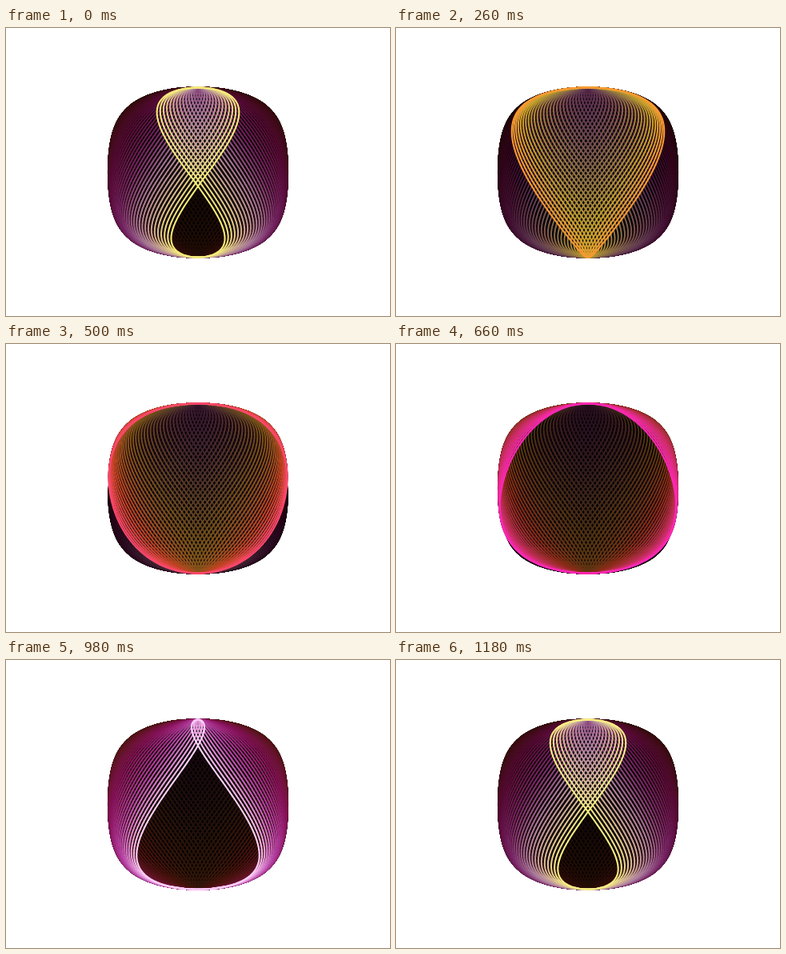
An HTML page with a canvas for the animation above (1200 ms loop, 480 by 360 pixels).

```html
<!DOCTYPE html>
<html>
<head>
<meta charset="utf-8">
<style>
  html, body { margin: 0; width: 100%; height: 100%; overflow: hidden; background: #fff; }
  canvas { display: block; }
</style>
</head>
<body>
<canvas id="stage" width="480" height="360"></canvas>
<script>
const ctx = document.getElementById('stage').getContext('2d');
const LOOP = 1200, STEP = 20, COUNT = LOOP / STEP;
const CX = 240, CY = 180.5, HEIGHT = 106;
const WIDE = 112, TWIST = 85;
const POINTS = 140;

// how many steps red, green and blue take to fade
const FADE = [24, 18, 21];

// time in ms, then red, green, blue
const STOPS = [
  [0, 248, 236, 120], [140, 245, 220, 56], [360, 255, 98, 45],
  [660, 255, 40, 184], [840, 240, 96, 226], [980, 255, 210, 250],
  [1180, 248, 240, 132], [1200, 248, 236, 120]
];

const wrap = ms => ((ms % LOOP) + LOOP) % LOOP;

function colorAt(ms, age) {
  const t = wrap(ms);
  const i = STOPS.findIndex(stop => stop[0] > t);
  const from = STOPS[i - 1], to = STOPS[i];
  const k = (t - from[0]) / (to[0] - from[0]);
  const rgb = FADE.map((steps, c) => {
    const full = from[c + 1] + (to[c + 1] - from[c + 1]) * k;
    return Math.round(full * Math.exp(-age / steps));
  });
  return `rgb(${rgb})`;
}

function strokeCurve(ms, color, width) {
  const phase = Math.PI * (ms + 43) / LOOP;
  const a = WIDE * Math.sin(phase), b = TWIST * Math.cos(phase);
  ctx.beginPath();
  for (let i = 0; i < POINTS; i++) {
    const u = i / POINTS * 2 * Math.PI;
    const c = Math.cos(u);
    ctx.lineTo(CX + Math.sin(u) * (a + b * c), CY - HEIGHT * c * (1.1 - 0.1 * c * c));
  }
  ctx.closePath();
  ctx.strokeStyle = color;
  ctx.lineWidth = width;
  ctx.stroke();
}

// The saturated colours die out a little sooner than the pale ones.
function isAlive(ms, age) {
  const t = wrap(ms);
  return age <= 55.5 || t < 100 || t > 800;
}

function draw(now) {
  ctx.fillStyle = '#fff';
  ctx.fillRect(0, 0, 480, 360);
  ctx.lineJoin = 'round';

  // dark bed between neighbouring lines
  for (let i = COUNT * 3; i > 0; i--) {
    const age = i / 3, ms = now - age * STEP;
    if (isAlive(ms, age)) strokeCurve(ms, '#000', 2.1);
  }
  for (let age = COUNT - 1; age >= 0; age--) {
    const ms = now - age * STEP;
    if (isAlive(ms, age)) strokeCurve(ms, colorAt(ms, age), 2.1);
  }
}

const start = performance.now();
let shown = -1;
function tick() {
  const frame = Math.floor((performance.now() - start) / STEP) % COUNT;
  if (frame !== shown) draw(frame * STEP);
  shown = frame;
  requestAnimationFrame(tick);
}
tick();
</script>
</body>
</html>
```
